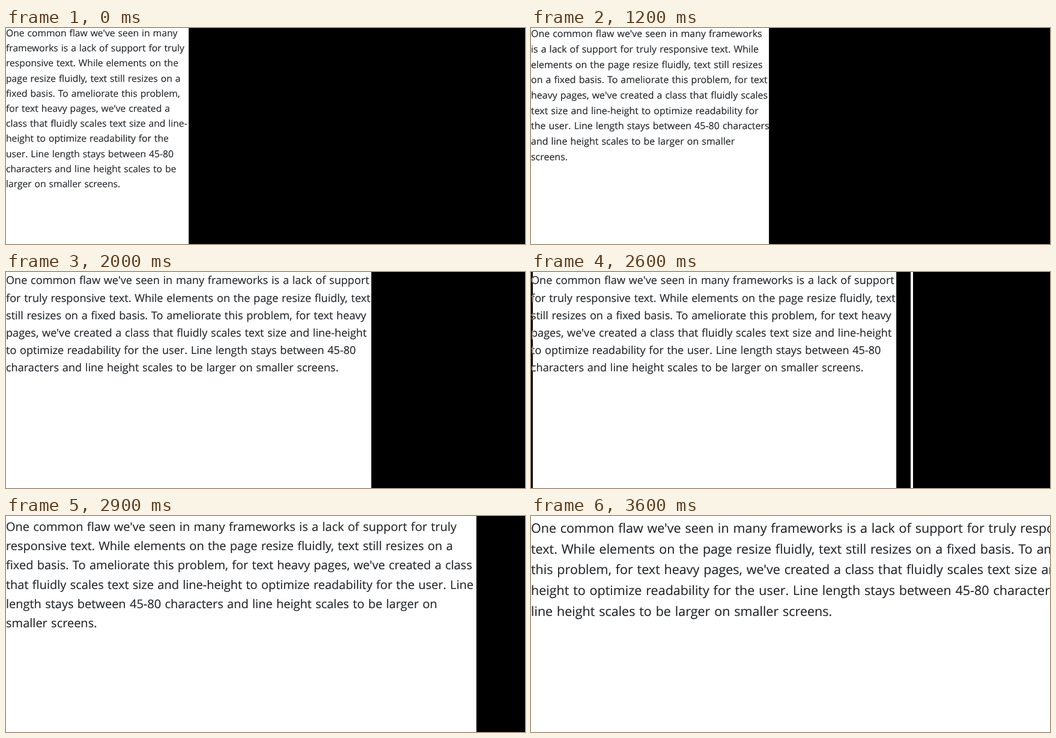
Write an HTML page that moves like this. It is 864 px wide and 361 px high and loops after 4500 ms.

```html
<!DOCTYPE html>
<html lang="en">
<head>
<meta charset="utf-8">
<title>Fluid text</title>
<style>
html, body { margin: 0; width: 100%; height: 100%; overflow: hidden; background: #000; }
svg { display: block; width: 864px; height: 361px; }
text {
  font-family: "Open Sans", "Noto Sans", sans-serif;
  font-variant-ligatures: none;
  word-spacing: 0.056em;
  text-rendering: geometricPrecision;
}
</style>
</head>
<body>
<svg viewBox="0 0 864 361">
  <defs>
    <clipPath id="paneClip"><rect id="paneCut" height="361"/></clipPath>
    <clipPath id="stripClip"><rect width="3" height="361"/></clipPath>
  </defs>
  <rect width="864" height="361" fill="#000"/>
  <rect id="border" width="1" height="361" fill="#1c1c1c"/>
  <rect id="pane" height="361" fill="#fff"/>
  <g clip-path="url(#paneClip)">
    <g id="copy" fill="#212529" stroke="#212529" stroke-width="0.15"></g>
  </g>
  <g id="strip" clip-path="url(#stripClip)">
    <rect width="3" height="361" fill="#000"/>
    <use href="#copy" id="ghost"/>
  </g>
  <rect id="handle" width="4" height="361" fill="#fff"/>
</svg>
<script>
const $ = id => document.getElementById(id);
const LOOP = 4500;
const COPY = "One common flaw we've seen in many frameworks is a lack of support for truly responsive text. " +
  "While elements on the page resize fluidly, text still resizes on a fixed basis. To ameliorate this problem, " +
  "for text heavy pages, we've created a class that fluidly scales text size and line-|height to optimize " +
  "readability for the user. Line length stays between 45-80 characters and line height scales to be larger " +
  "on smaller screens.";

// Pane width, type size, line pitch, first baseline, last word of each line
const layouts = [
  { width: 304, size: 15.66, pitch: 25.2, top: 14, ends: "many truly the a problem, a line- the 45-80 be" },
  { width: 396, size: 15.97, pitch: 25.7, top: 15.2, ends: "frameworks While resizes text scales for characters smaller" },
  { width: 608, size: 18.12, pitch: 29.2, top: 20.4, ends: "support text heavy line-height 45-80" },
  { width: 783, size: 20, pitch: 32.2, top: 25, ends: "truly a class Line on" },
  { width: 864, size: 21.54, pitch: 34.7, top: 28, ends: "responsive ameliorate line- and" }
];

function breakLines(ends) {
  const stops = ends.split(" ");
  // Short words recur, so a line must be reasonably full before it ends
  const minChars = COPY.length / (stops.length + 1) * 0.75;
  const words = COPY.replace("|", stops.includes("line-") ? " " : "").split(" ");
  const lines = [];
  let line = "";
  for (const word of words) {
    line += (line && " ") + word;
    if (word === stops[0] && line.length >= minChars) {
      lines.push(line);
      stops.shift();
      line = "";
    }
  }
  return [...lines, line];
}

for (const item of layouts) item.lines = breakLines(item.ends);

// Time, layout, visible width, strip on the left, drag handle x
const steps = [
  [0, 0, 304],
  [1000, 0, 304, true, 327],
  [1100, 1, 304],
  [1200, 1, 396],
  [1700, 1, 396, true, 420],
  [1800, 1, 396, true, 605],
  [1900, 2, 396],
  [2000, 2, 608],
  [2600, 2, 608, true, 632],
  [2700, 2, 608, true, 780],
  [2800, 3, 608],
  [2900, 3, 783],
  [3200, 3, 783, true, 782],
  [3300, 3, 783, true],
  [3500, 4, 783],
  [3600, 4, 864]
];

function setLayout({ width, size, pitch, top, lines }) {
  $("border").setAttribute("x", width);
  $("copy").setAttribute("font-size", size);
  $("copy").replaceChildren(...lines.map((line, i) => {
    const row = document.createElementNS("http://www.w3.org/2000/svg", "text");
    row.setAttribute("y", Math.round(top + i * pitch));
    row.textContent = line;
    return row;
  }));
}

let shown = null, laidOut = -1;

function render(ms) {
  const step = steps.findLast(s => s[0] <= ms % LOOP);
  if (step === shown) return;
  shown = step;
  const [, layout, width, strip, handleX = -10] = step;
  if (layout !== laidOut) setLayout(layouts[laidOut = layout]);
  $("pane").setAttribute("width", width);
  $("paneCut").setAttribute("width", width);
  $("strip").style.display = strip ? "" : "none";
  $("handle").setAttribute("x", handleX);
}

// Letters under the dark strip stay faintly visible
$("ghost").style.filter = "invert(0.7)";

const start = performance.now();
function tick() {
  render(performance.now() - start);
  requestAnimationFrame(tick);
}
tick();
</script>
</body>
</html>
```
